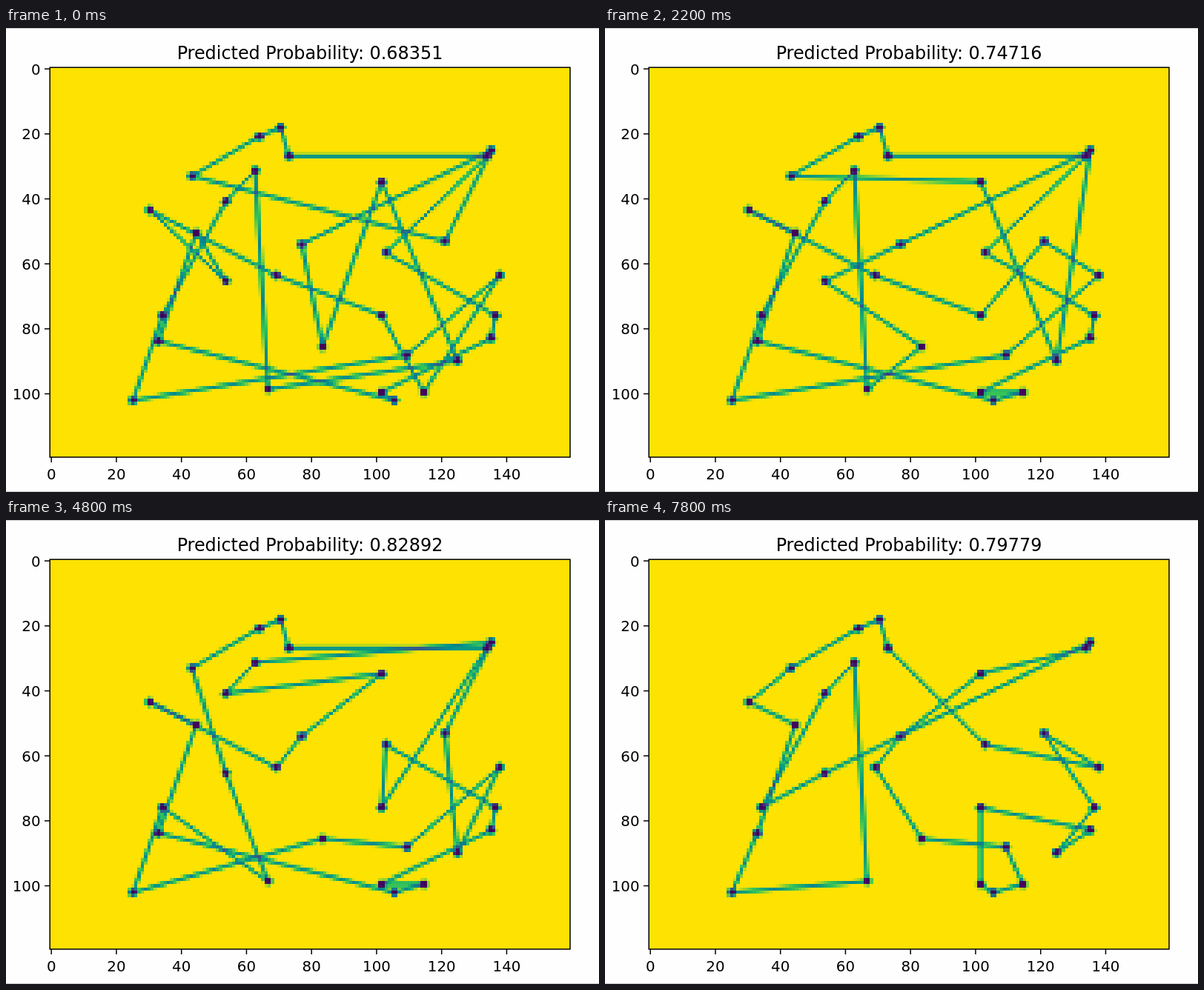
An HTML page with a canvas that plays this animation: 800x626 px, repeating every 8000 ms.

```html
<!DOCTYPE html>
<html lang="en">
<head>
<meta charset="utf-8">
<title>Predicted Probability</title>
<style>
  html, body { margin: 0; width: 100%; height: 100%; overflow: hidden; background: #fefefe; }
  canvas, svg { position: absolute; display: block; }
  canvas { left: 59px; top: 53px; width: 702px; height: 526px; image-rendering: pixelated; }
  svg { left: 0; top: 0; }
  text { font: 19.8px "DejaVu Sans", Verdana, sans-serif; }
  #title { font-size: 23.9px; }
</style>
</head>
<body>
<canvas id="plot" width="160" height="120"></canvas>
<svg id="axes" width="800" height="626" viewBox="0 0 800 626">
  <path d="M0 .5H800M0 625.5H800" stroke="#c8c8cc"/>
  <rect x="59.2" y="53.2" width="701.8" height="525.8" fill="none" stroke="#000" stroke-width="1.5"/>
  <text id="title" x="410" y="42" text-anchor="middle"></text>
</svg>
<script>
const W = 160, H = 120, STEP = 200, LOOP = 8000;

// Cities on an 87 by 96 map, lettered A to Z, then a to d
const NAMES = 'ABCDEFGHIJKLMNOPQRSTUVWXYZabcd';
const MAP = `35,0 30,3 37,10 14,17 29,15 22,26 4,29 15,37 22,54 34,52
  40,41 59,19 84,10 85,8 74,40 60,44 87,52 86,66 85,74 77,82
  65,80 59,66 69,93 59,93 62,96 45,77 32,92 7,66 6,75 0,96`;

// The map fills a plot area with a margin of 1/22 on each side
const fit = (k, count, start, size) => start + size * (1 / 22 + k / count * 10 / 11);
const cities = MAP.split(/\s+/).map(pair => {
  const [x, y] = pair.split(',');
  return [fit(x, 87, W * 0.125, W * 0.775), fit(y, 96, H * 0.12, H * 0.77)];
});

const KEYS = [
  { step: 0, prob: 0.68351, tour: 'ACMPRSXYcHIGJVWQUdbFEaTLZKNODB' },
  { step: 6, prob: 0.72492, tour: 'ACMPRSXYcHIGJVdbFEaZQUWOKNTLDB' },
  { step: 11, prob: 0.74716, tour: 'ACMPRSXWYcHGJVOQUdbFEaZIKNTLDB' },
  { step: 18, prob: 0.77679, tour: 'ACMNQOTSVUZdbFEaIPRXWYcHGJKLDB' },
  { step: 24, prob: 0.82892, tour: 'ACMVPRSXWYcHGJKLFENOTQUZdbaIDB' },
  { step: 33, prob: 0.81387, tour: 'ACMNQOSVWTPRXYcHGJIbaUZdFEKLDB' },
  { step: 39, prob: 0.79779, tour: 'ACPQORTSVXYWUZJKLMNIbFEadcHGDB' }
];

// Every tour on the way from one to another, one segment reversal at a time
function reversals(from, to) {
  const list = [from];
  let tour = from;
  for (let i = 0; i < to.length; i++) {
    const j = tour.indexOf(to[i]);
    if (j === i) continue;
    const part = [...tour.slice(i, j + 1)].reverse().join('');
    tour = tour.slice(0, i) + part + tour.slice(j + 1);
    list.push(tour);
  }
  return list;
}

function stateAt(step) {
  const next = Math.max(1, KEYS.findIndex(k => k.step >= step));
  const a = KEYS[next - 1], b = KEYS[next];
  const u = (step - a.step) / (b.step - a.step);
  const list = reversals(a.tour, b.tour);
  return {
    tour: list[Math.round(u * (list.length - 1))],
    prob: a.prob + (b.prob - a.prob) * u
  };
}

const ctx = document.getElementById('plot').getContext('2d', { willReadFrequently: true });
const title = document.getElementById('title');
const axes = document.getElementById('axes');

// Colour map sampled from a gradient strip
function makePalette(colors) {
  const strip = document.createElement('canvas');
  strip.width = 256;
  strip.height = 1;
  const g = strip.getContext('2d');
  const ramp = g.createLinearGradient(0, 0, 256, 0);
  colors.forEach((c, i) => ramp.addColorStop(i / (colors.length - 1), c));
  g.fillStyle = ramp;
  g.fillRect(0, 0, 256, 1);
  return g.getImageData(0, 0, 256, 1).data;
}
const palette = makePalette(['#44015a', '#38548c', '#00908c', '#38c456', '#ffe200']);

function add(tag, attrs, text = '') {
  const el = document.createElementNS(axes.namespaceURI, tag);
  for (const name in attrs) el.setAttribute(name, attrs[name]);
  el.textContent = text;
  axes.append(el);
}

function addTicks() {
  const tick = d => add('path', { d, stroke: '#000', 'stroke-width': 1.5 });
  for (let v = 0; v < W; v += 20) {
    const x = 59 + (v + 0.5) * 702 / W, y = 53 + (v + 0.5) * 526 / H;
    tick(`M${x} 579v7`);
    add('text', { x, y: 609, 'text-anchor': 'middle' }, v);
    if (v >= H) continue;
    tick(`M59 ${y}h-7`);
    add('text', { x: 46.5, y: y + 7.4, 'text-anchor': 'end' }, v);
  }
}

function drawTour(tour) {
  ctx.fillStyle = '#fff';
  ctx.fillRect(0, 0, W, H);
  ctx.fillStyle = '#000';
  ctx.lineWidth = 0.55;
  const path = [...tour].map(c => cities[NAMES.indexOf(c)]);
  path.forEach((p, i) => {
    ctx.beginPath();
    ctx.moveTo(...p);
    ctx.lineTo(...path[(i + 1) % path.length]);
    ctx.stroke();
    ctx.beginPath();
    ctx.arc(...p, 1.25, 0, 2 * Math.PI);
    ctx.fill();
  });
  const img = ctx.getImageData(0, 0, W, H), px = img.data;
  for (let i = 0; i < px.length; i += 4) {
    px.set(palette.subarray(px[i] * 4, px[i] * 4 + 4), i);
  }
  ctx.putImageData(img, 0, 0);
}

let shown = -1;
const begin = performance.now();

function render() {
  const step = Math.floor((performance.now() - begin) % LOOP / STEP);
  if (step !== shown) {
    const { tour, prob } = stateAt(step);
    drawTour(tour);
    title.textContent = 'Predicted Probability: ' + prob.toFixed(5);
    shown = step;
  }
  requestAnimationFrame(render);
}

addTicks();
render();
</script>
</body>
</html>
```
